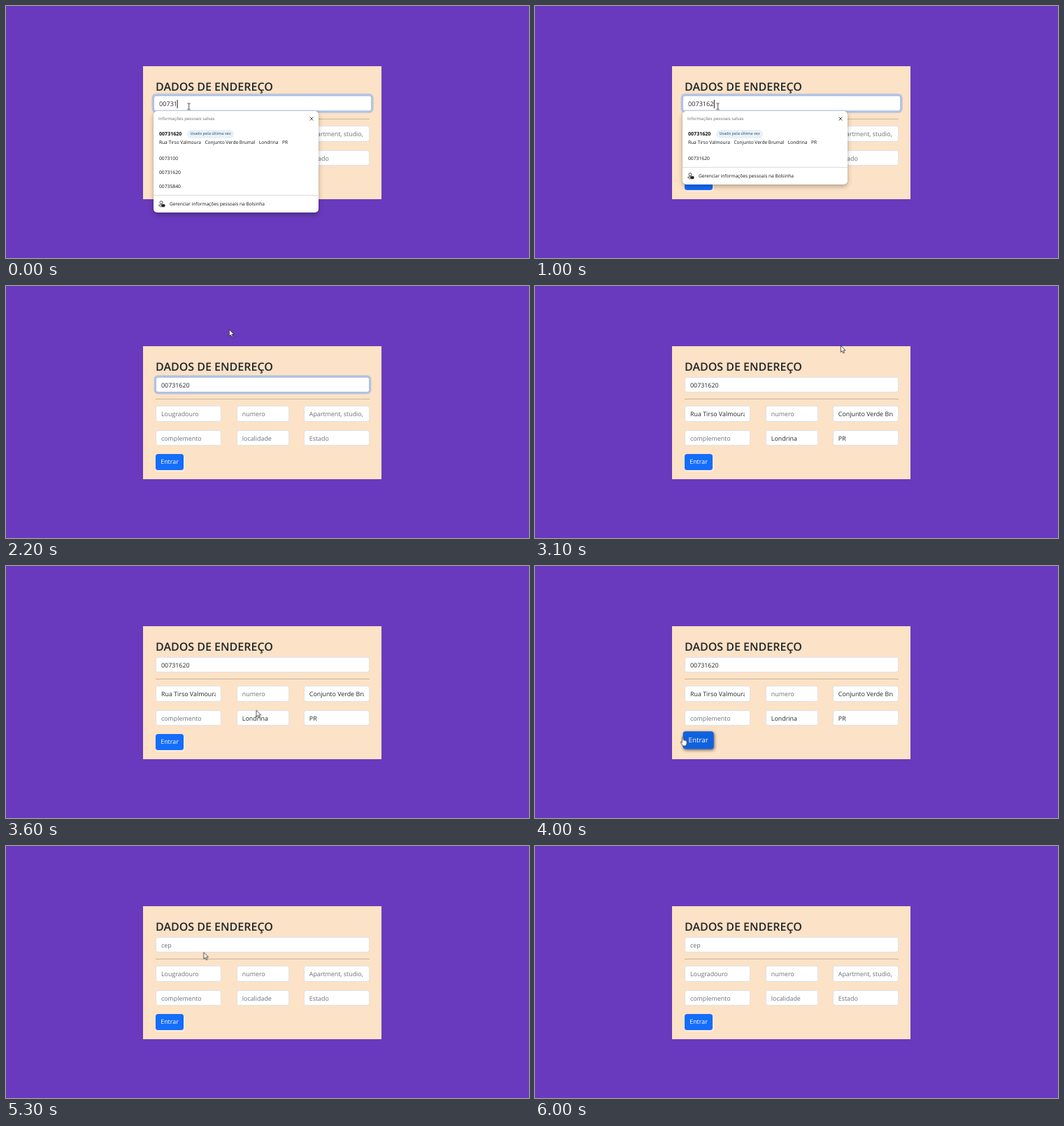
An HTML page for the animation above (6700 ms loop, 748 px wide and 360 px high).

```html
<!DOCTYPE html>
<html lang="pt-BR">
<head>
<meta charset="utf-8">
<title>Dados de endereço</title>
<style>
  html, body { margin: 0; width: 100%; height: 100%; overflow: hidden; }
  body {
    position: relative; background: #693abd; color: #212529;
    font: 8.9px/22px "Open Sans", "Noto Sans", sans-serif;
    text-rendering: geometricPrecision; white-space: nowrap;
  }
  div, span, h1, svg { box-sizing: border-box; }
  .card, .card > *, .field span, .menu, .cursor, .cursor svg { position: absolute; }

  /* every timed part shares one clock; states switch hard */
  .timed { animation: 6.7s step-end infinite; }

  .card { left: 196px; top: 86px; width: 341px; height: 190px; background: #fce2c6; }
  h1 { left: 18px; top: 19px; margin: 0; font-size: 16px; font-weight: 600; line-height: 20px; }
  .rule { left: 18px; top: 75px; width: 306px; height: 1px; background: rgba(33, 37, 41, .23); }

  .field {
    left: var(--x); top: var(--y); width: var(--w); height: 22.2px;
    border: .6px solid #dee2e6; border-radius: 3.5px; background: #fff;
  }
  .field > div { position: absolute; inset: 0 7px; overflow: hidden; line-height: 21.6px; }
  .field span { left: 0; top: 0; }
  .hint { color: #6a7077; }
  .r1 { --y: 85.4px; } .r2 { --y: 119.5px; }
  .c1 { --x: 18px; --w: 94.3px; }
  .c2 { --x: 133.8px; --w: 75px; }
  .c3 { --x: 229.8px; --w: 94px; }
  .value { animation-name: filled; }
  .value + .hint { animation-name: unfilled; }

  .cep { --x: 18px; --y: 43.6px; --w: 306px; animation-name: focus; }
  .cep .typed {
    top: 4.8px; height: 12px; line-height: 12px; overflow: hidden;
    box-sizing: content-box; border-right: .8px solid #222; animation-name: type;
  }
  .cep .hint { animation-name: cleared; }

  .button {
    left: 18px; top: 153.6px; width: 40px; height: 22.6px; border-radius: 3.5px;
    background: #146dfb; color: #fff; text-align: center; line-height: 22.2px;
    box-shadow: 1.5px 2px 3px rgba(255, 255, 255, .5); animation-name: press;
  }

  .menu {
    left: 211px; top: 150px; width: 236px; border-radius: 5px; background: #fff; color: #111;
    box-shadow: 0 0 1px rgba(0, 0, 0, .45), 0 3px 7px rgba(0, 0, 0, .28);
    font-size: 6.6px; animation-name: menu;
  }
  .menu > div { padding-left: 8px; }
  .menu .title { padding-left: 7px; height: 25.7px; line-height: 21px; font-size: 6.1px; color: #686868; }
  .best { height: 14px; line-height: 14px; font-size: 7.1px; font-weight: 700; }
  .best span {
    display: inline-block; height: 12px; margin-left: 7.5px; padding: 0 4.5px; border-radius: 6px;
    vertical-align: top; margin-top: 1px; background: #e6f1fa; color: #5b6c7e;
    font-size: 5.5px; font-weight: 600; line-height: 11.5px;
  }
  .address { display: flex; gap: 5.5px; height: 18px; line-height: 10.5px; }
  .row { height: 20px; line-height: 19px; font-size: 6.75px; overflow: hidden; }
  .drop1 { animation-name: drop1; }
  .drop2 { animation-name: drop2; }
  .menu .manage { height: 25px; margin-top: 2px; padding-left: 23px; border-top: 1px solid #dcdcdc; line-height: 24.7px; }
  .menu svg { position: absolute; fill: none; stroke: #222; }
  .close { right: 7px; top: 7.5px; }
  .person { left: 7px; bottom: 7px; }

  .cursor { left: 0; top: 0; animation-name: move; }
  .cursor svg { overflow: visible; left: 0; top: 0; }
  .beam { animation-name: beam; }
  .arrow { animation-name: arrow; }
  .hand { animation-name: hand; }

  @keyframes filled { 0% { opacity: 0 } 38.805% { opacity: 1 } 71.641%, 100% { opacity: 0 } }
  @keyframes unfilled { 0% { opacity: 1 } 38.805% { opacity: 0 } 71.641%, 100% { opacity: 1 } }
  @keyframes cleared { 0% { opacity: 0 } 71.641%, 100% { opacity: 1 } }
  @keyframes type {
    0% { width: 5ch; opacity: 1; border-color: #222 }
    7.462% { width: 6ch; opacity: 1; border-color: #222 }
    14.925% { width: 7ch; opacity: 1; border-color: #222 }
    17.91% { width: 8ch; opacity: 1; border-color: #222 }
    28.358% { width: 8ch; opacity: 1; border-color: transparent }
    71.641%, 100% { width: 8ch; opacity: 0; border-color: transparent }
  }
  @keyframes focus {
    0% { transform: translateY(-2px) scale(1.02); border-color: #aabfe8; box-shadow: 0 0 0 2.4px #b4c3e0 }
    32.835% { transform: none; border-color: #aabfe8; box-shadow: 0 0 0 2.4px #b4c3e0 }
    37.313%, 100% { transform: none; border-color: #dee2e6; box-shadow: none }
  }
  @keyframes menu { 0% { opacity: 1 } 19.402%, 100% { opacity: 0 } }
  @keyframes drop1 { 0% { height: 20px } 8.955%, 100% { height: 0 } }
  @keyframes drop2 { 0% { height: 20px } 14.925%, 100% { height: 0 } }
  @keyframes press {
    0% { transform: none; background: #146dfb; box-shadow: 1.5px 2px 3px rgba(255, 255, 255, .5) }
    58.208% { transform: translate(-.2px, -1.3px) scale(1.05); background: #1267ec; box-shadow: .5px 1px 3px rgba(0, 0, 0, .3) }
    59.701% { transform: translate(-.4px, -2.7px) scale(1.1); background: #1161df; box-shadow: .8px 1.5px 4px rgba(0, 0, 0, .6) }
    61.194% { transform: translate(-.5px, -3.5px) scale(1.14); background: #105cd6; box-shadow: 1px 1.8px 5px rgba(0, 0, 0, .75) }
    62.686% { transform: translate(-.5px, -3.9px) scale(1.17); background: #0f59d0; box-shadow: 1px 2px 5px rgba(0, 0, 0, .85) }
    71.641%, 100% { transform: none; background: #146dfb; box-shadow: 1.5px 2px 3px rgba(255, 255, 255, .5) }
  }
  @keyframes move {
    0% { transform: translate(261.5px, 143.5px) }
    28.358% { transform: translate(264px, 138px) }
    32.835% { transform: translate(319px, 62px); animation-timing-function: steps(4) }
    38.805% { transform: translate(349px, 47px) }
    41.791% { transform: translate(350px, 48px) }
    44.776% { transform: translate(400px, 66px) }
    46.268% { transform: translate(437px, 85px); animation-timing-function: steps(3) }
    50.746% { transform: translate(455px, 180px); animation-timing-function: steps(5) }
    58.208% { transform: translate(211.5px, 244.5px) }
    65.671% { transform: translate(211.5px, 244.5px); animation-timing-function: steps(3) }
    70.149% { transform: translate(227px, 251.5px) }
    74.626% { transform: translate(227px, 251.5px); animation-timing-function: steps(6) }
    83.582% { transform: translate(338px, 52px); animation-timing-function: steps(4) }
    89.552%, 100% { transform: translate(322px, -16px) }
  }
  @keyframes beam { 0% { opacity: 1 } 32.835%, 100% { opacity: 0 } }
  @keyframes arrow { 0% { opacity: 0 } 32.835% { opacity: 1 } 58.208% { opacity: 0 } 71.641%, 100% { opacity: 1 } }
  @keyframes hand { 0% { opacity: 0 } 58.208% { opacity: 1 } 71.641%, 100% { opacity: 0 } }
</style>
</head>
<body>
  <div class="card">
    <h1>DADOS DE ENDEREÇO</h1>
    <div class="field cep timed"><div><span class="typed timed">00731620</span><span class="hint timed">cep</span></div></div>
    <div class="rule"></div>
    <div class="field r1 c1"><div><span class="value timed">Rua Tirso Valmoura</span><span class="hint timed">Lougradouro</span></div></div>
    <div class="field r1 c2"><div><span class="hint">numero</span></div></div>
    <div class="field r1 c3"><div><span class="value timed">Conjunto Verde Brumal</span><span class="hint timed">Apartment, studio,</span></div></div>
    <div class="field r2 c1"><div><span class="hint">complemento</span></div></div>
    <div class="field r2 c2"><div><span class="value timed">Londrina</span><span class="hint timed">localidade</span></div></div>
    <div class="field r2 c3"><div><span class="value timed">PR</span><span class="hint timed">Estado</span></div></div>
    <div class="button timed">Entrar</div>
  </div>

  <div class="menu timed">
    <div class="title">Informações pessoais salvas</div>
    <svg class="close" width="6" height="6" stroke-width=".8"><path d="M.5 .5l5 5M5.5 .5l-5 5"/></svg>
    <div class="best">00731620<span>Usado pela última vez</span></div>
    <div class="address"><span>Rua Tirso Valmoura</span><span>Conjunto Verde Brumal</span><span>Londrina</span><span>PR</span></div>
    <div class="row drop2 timed">0073100</div>
    <div class="row">00731620</div>
    <div class="row drop1 timed">00735840</div>
    <div class="manage">Gerenciar informações pessoais na Bolsinha</div>
    <svg class="person" width="10" height="10" stroke-width=".8">
      <circle cx="4" cy="2.7" r="2"/>
      <path d="M4 8.8C1.8 8.8 .8 8 .8 6.2H4"/>
      <rect x="4.6" y="5.4" width="4.4" height="3.4" rx=".6" fill="#222"/>
    </svg>
  </div>

  <div class="cursor timed">
    <svg class="beam timed" width="1" height="1" fill="none" stroke="#222" stroke-width=".9">
      <path d="M-2 -4.5Q0 -4.5 0 -3.6Q0 -4.5 2 -4.5M0 -3.6V3.6M-2 4.5Q0 4.5 0 3.6Q0 4.5 2 4.5"/>
    </svg>
    <svg class="arrow timed" width="1" height="1" fill="#fff" stroke="#111" stroke-width=".7">
      <path d="M.3 .3V9.6L2.4 7.6L3.9 11L5.5 10.3L4 7H7Z"/>
    </svg>
    <svg class="hand timed" width="1" height="1" fill="#fff" stroke="#111" stroke-width=".7" stroke-linejoin="round">
      <path d="M-1 .9Q-1 0 0 0T1 .9V4.3Q2 3.6 2.7 4.7Q3.7 4.2 4.3 5.2Q5.8 4.8 5.8 6.2V8.5Q5.8 10 4.8 11V12.6H-.6V11.4L-3 8Q-3.5 6.8 -2.4 6.7L-1 7.7Z"/>
    </svg>
  </div>
</body>
</html>
```
